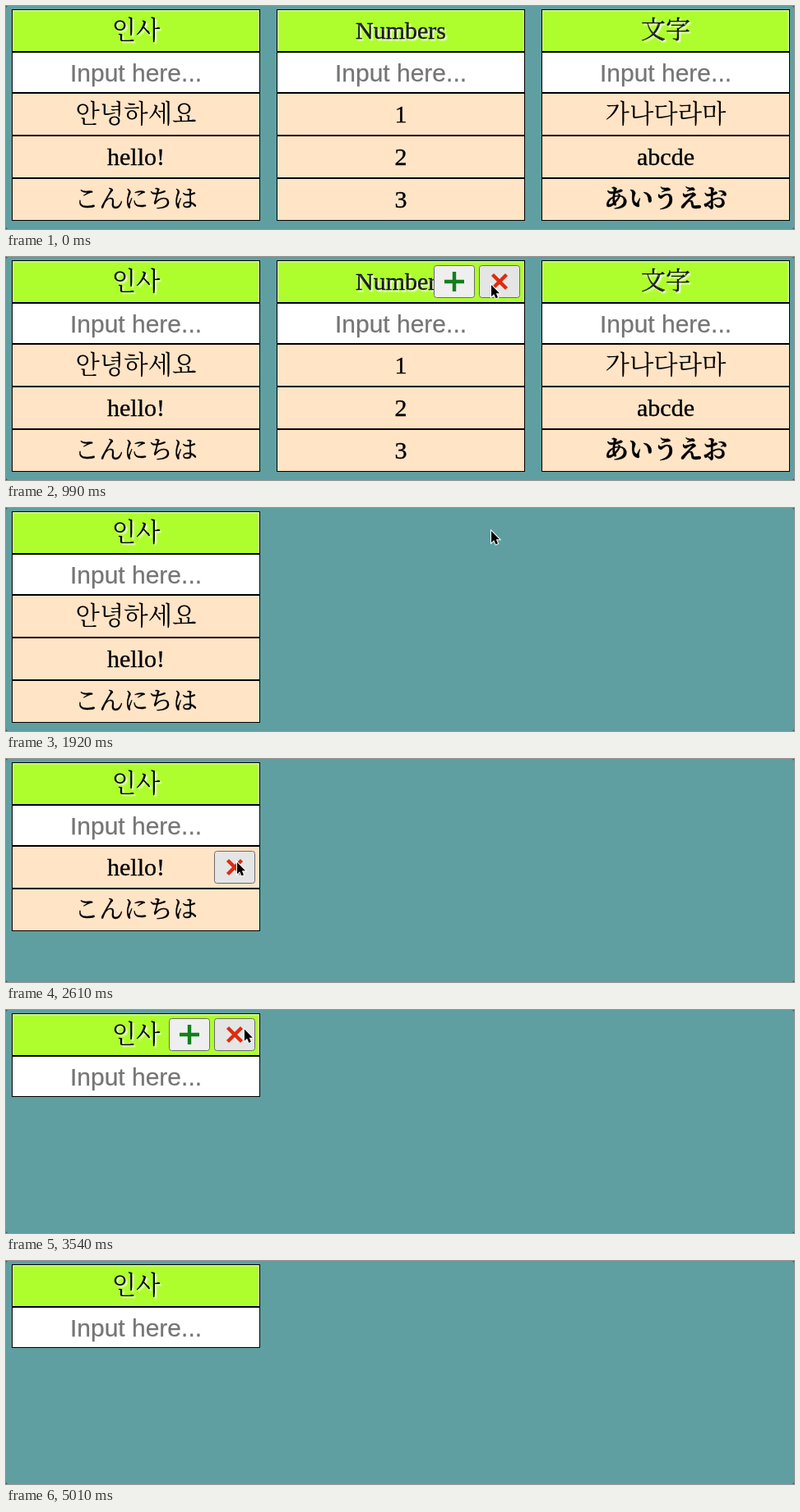
Write an HTML page that moves like this. It is 958 px wide and 272 px high and loops after 6.24 s.

```html
<!DOCTYPE html>
<html lang="en">
<head>
<meta charset="utf-8">
<title>Lists</title>
<style>
  html, body { margin: 0; width: 100%; height: 100%; overflow: hidden; background: #2c4647; }
  svg { display: block; width: 958px; height: 272px; background: #609fa1; border-radius: 3px; }
  text { font: 30px "Liberation Serif", Times, serif; text-anchor: middle; stroke: #000; stroke-width: .35; }
  .ko { font: 30.4px "Noto Serif CJK KR", "Noto Sans CJK KR", "Noto Sans CJK", serif; stroke: none; }
  .ja { font: 30px "Noto Serif CJK JP", "Noto Sans CJK JP", "Noto Sans CJK", serif; }
  .bold { font-weight: 600; }
  .hint { font: 30px "Liberation Sans", Arial, sans-serif; fill: #757575; stroke: #757575; stroke-width: .25; }
  .title { text-shadow: 2px 2px 2px rgba(250, 250, 250, .95); }
  .cell { stroke: #000; }
  .shine { fill: none; stroke: #fff; stroke-width: 1.5; opacity: .5; }
  .button rect { fill: #efefef; stroke: #6b6b6b; }
  .button.over rect { fill: #e5e5e5; }
  .button path { fill: none; stroke-width: 4.4; }
</style>
</head>
<body>
<svg id="stage" viewBox="0 0 958 272"></svg>
<script>
const LOOP = 6240, STEP = 30;
const LEFT = 7, PITCH = 322, WIDTH = 302;
const TITLE_TOP = 4, INPUT_TOP = 56, ROWS_TOP = 106, ROW = 52;

// [text, class]
const LISTS = [
  { title: ["인사", "ko"], rows: [["안녕하세요", "ko"], ["hello!", ""], ["こんにちは", "ja"]] },
  { title: ["Numbers", ""], rows: [["1", ""], ["2", ""], ["3", ""]] },
  { title: ["文字", "ja"], rows: [["가나다라마", "ko"], ["abcde", ""], ["あいうえお", "ja bold"]] }
];
const LIST_CLICKS = [1290, 1680];
const ROW_CLICKS = [2430, 2700, 2970];

const ENTER = { at: 30, x: 478, y: 262 }, GONE = 5010;
// pointer moves: start, end, x, y
const MOVES = [
  [30, 630, 512, 44],
  [630, 870, 612, 10],
  [870, 990, 590, 34],
  [1290, 1470, 590, 28],
  [1920, 2280, 264, 130],
  [2280, 2400, 281, 126],
  [3150, 3570, 290, 22],
  [3600, 4020, 167.5, 93],
  [4620, 5010, 412, 245]
];

const stage = document.getElementById("stage");

function add(parent, tag, attrs = {}, text = "") {
  const el = document.createElementNS("http://www.w3.org/2000/svg", tag);
  for (const name in attrs) el.setAttribute(name, attrs[name]);
  el.textContent = text;
  return parent.appendChild(el);
}

function addCell(parent, y, height, fill, [text, cls]) {
  const g = add(parent, "g");
  const base = y + (cls.startsWith("ja") ? 35 : 36);
  add(g, "rect", { class: "cell", x: .5, y: y + .5, width: WIDTH - 1, height: height - 1, fill });
  add(g, "text", { class: cls, x: WIDTH / 2, y: base }, text);
  return g;
}

function addButton(color, icon) {
  const g = add(stage, "g", { class: "button" });
  add(g, "rect", { x: .5, y: .5, width: 49, height: 39, rx: 3 });
  add(g, "path", { d: icon, stroke: color });
  return g;
}

const columns = LISTS.map(({ title: [text, cls], rows }) => {
  const g = add(stage, "g");
  const head = addCell(g, TITLE_TOP, 52, "#aefd2d", [text, cls + " title"]);
  add(head, "path", { class: "shine", d: `M1.75 55V5.75H${WIDTH - 1.75}V55` });
  addCell(g, INPUT_TOP, 50, "#fff", ["Input here...", "hint"]);
  return { g, rows: rows.map(row => addCell(g, 0, ROW, "#ffe4c6", row)) };
});

const plus = addButton("#11801a", "M25 8V32M13 20H37");
const cross = addButton("#dd2c10", "M16.5 11.5L33.5 28.5M33.5 11.5L16.5 28.5");
const arrow = add(stage, "path", {
  d: "M0 0V14.2L3.2 11.2L5.5 16.4L8 15.3L5.8 10.3H10Z",
  stroke: "#fff", "stroke-width": 2, "paint-order": "stroke"
});
const beam = add(stage, "g", { fill: "none" });
const beamShape = "M-3.2 -8.5Q0 -8.5 0 -6.6Q0 -8.5 3.2 -8.5M0 -6.6V6.6M-3.2 8.5Q0 8.5 0 6.6Q0 8.5 3.2 8.5M-2 2.5H2";
add(beam, "path", { d: beamShape, stroke: "#fff", "stroke-width": 2.4 });
add(beam, "path", { d: beamShape, stroke: "#000", "stroke-width": 1.2 });

const show = (el, on) => { el.style.display = on ? "" : "none"; };
const place = (el, x, y) => el.setAttribute("transform", `translate(${x} ${y})`);
const ease = k => k * k * (3 - 2 * k);

function pointerAt(t) {
  let { x, y } = ENTER;
  for (const [start, end, toX, toY] of MOVES) {
    const k = ease(Math.min(1, Math.max(0, (t - start) / (end - start))));
    x += (toX - x) * k;
    y += (toY - y) * k;
  }
  return { x, y };
}

function showButton(el, left, top, { x, y }) {
  show(el, true);
  place(el, left, top);
  el.classList.toggle("over", x >= left && x < left + 50 && y >= top && y < top + 40);
}

function render(t) {
  const clicked = times => times.filter(time => t >= time).length;
  const listsCut = clicked(LIST_CLICKS), rowsCut = clicked(ROW_CLICKS);
  const counts = [];

  // deletions hit the second list, then the first list's rows
  columns.forEach(({ g, rows }, i) => {
    const slot = i ? i - listsCut : 0;
    const cut = i ? 0 : rowsCut;
    const visible = !i || slot > 0;
    show(g, visible);
    if (!visible) return;
    place(g, LEFT + slot * PITCH, 0);
    rows.forEach((row, n) => {
      show(row, n >= cut);
      place(row, 0, ROWS_TOP + (n - cut) * ROW);
    });
    counts[slot] = rows.length - cut;
  });

  for (const el of [plus, cross, arrow, beam]) show(el, false);
  if (t < ENTER.at || t >= GONE) return;

  const pointer = pointerAt(t), { x, y } = pointer;
  const slot = Math.floor((x - LEFT) / PITCH);
  const left = LEFT + slot * PITCH;
  const row = Math.floor((y - ROWS_TOP) / ROW);
  const inside = slot in counts && x < left + WIDTH;

  if (inside && y >= TITLE_TOP && y < INPUT_TOP) {
    showButton(plus, left + 191, TITLE_TOP + 6, pointer);
    showButton(cross, left + 246, TITLE_TOP + 6, pointer);
  } else if (inside && row >= 0 && row < counts[slot]) {
    showButton(cross, left + 246, ROWS_TOP + row * ROW + 6, pointer);
  }
  const shape = inside && y >= INPUT_TOP && y < ROWS_TOP ? beam : arrow;
  show(shape, true);
  place(shape, x, y);
}

const start = performance.now();
function tick() {
  const t = (performance.now() - start) % LOOP;
  render(Math.floor(t / STEP) * STEP);
  requestAnimationFrame(tick);
}
tick();
</script>
</body>
</html>
```
